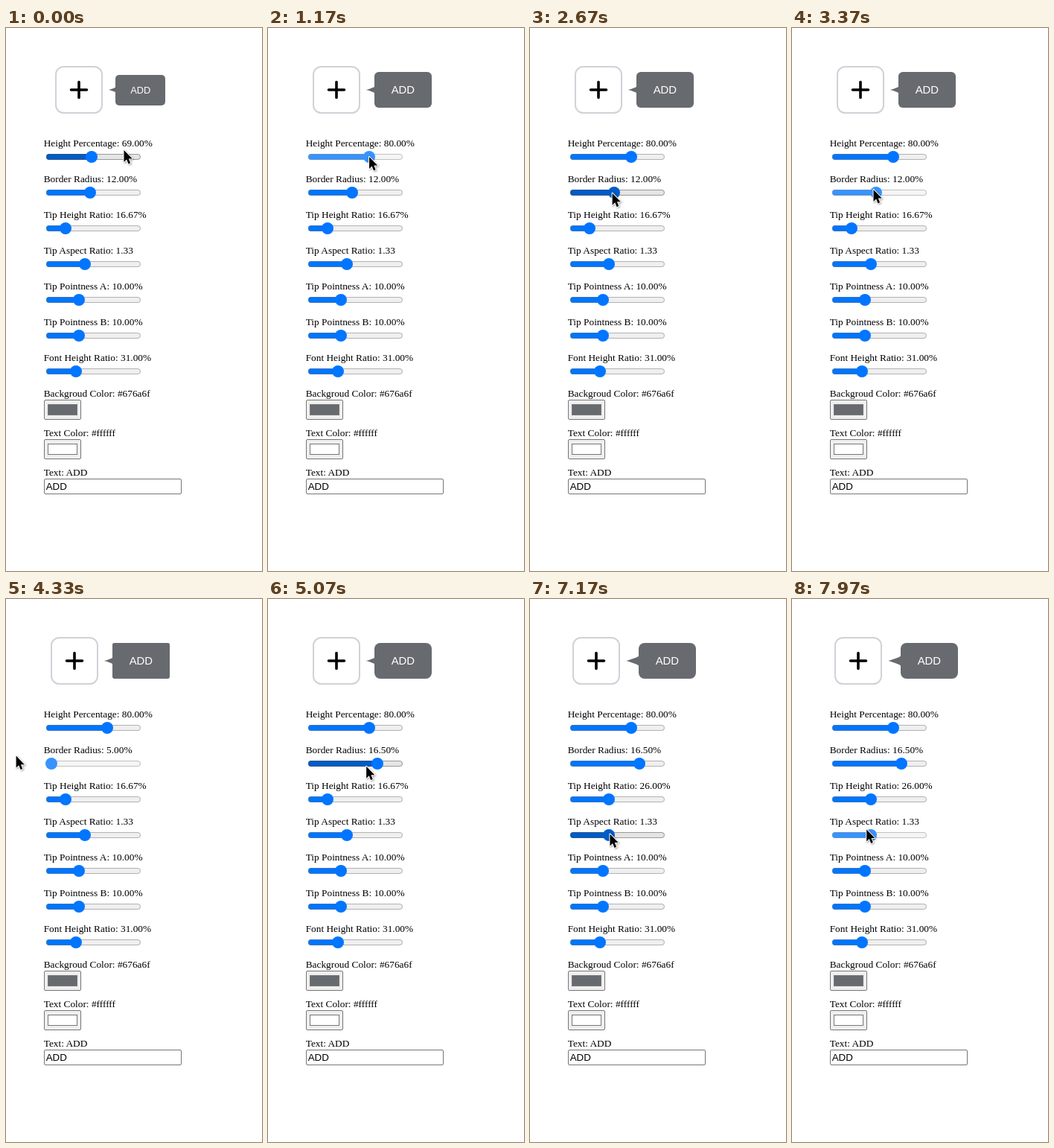
Animation, 344 px wide and 729 px high, one loop 8 s. Source, as an HTML page:

```html
<!DOCTYPE html>
<html lang="en">
<head>
<meta charset="utf-8">
<title>Tooltip playground</title>
<style>
  html, body { margin: 0; width: 100%; height: 100%; overflow: hidden; background: #fff; }
  svg { position: absolute; left: 0; top: 0; }
  .label, .sans { position: absolute; white-space: pre; }
  .label { left: 50.7px; font: 13.3333px "Liberation Serif", "Times New Roman", serif; }
  .sans { font: 13.3333px "Liberation Sans", Arial, sans-serif; }
  #bubble { display: flex; align-items: center; justify-content: center; color: #fff; background: #676a6f; }
  .field { fill: #fff; stroke: #767676; }
  .slider, .thumb { --accent: #0075ff; --track: #efefef; --edge: #767676; }
  .hover { --accent: #005cc8; --track: #e5e5e5; --edge: #4f4f4f; }
  .active { --accent: #3793ff; --track: #f5f5f5; --edge: #8d8d8d; }
  .track { fill: var(--track); }
  .fill, .thumb { fill: var(--accent); }
  .edge { fill: none; stroke: var(--edge); stroke-opacity: .5; }
  #cursor { filter: drop-shadow(1px 1.5px 1px rgba(0, 0, 0, .35)); }
</style>
</head>
<body>
<svg width="344" height="729">
  <g id="button">
    <rect x="1" y="52" width="62" height="62" rx="10.5" fill="#fff" stroke="#d1d1d8" stroke-width="2"/>
    <path d="M21.5 83h21M32 72.5v21" stroke="#000" stroke-width="3.6" stroke-linecap="round"/>
  </g>
  <path id="tip" fill="#676a6f"/>
  <g id="sliders"></g>
  <rect class="field" x="51.5" y="499.5" width="49" height="26" rx="1.5" style="fill:#efefef"/>
  <rect x="56.5" y="505.5" width="39" height="14" fill="#676a6f" stroke="#777"/>
  <rect class="field" x="51.5" y="552.5" width="49" height="26" rx="1.5" style="fill:#efefef"/>
  <rect x="56.5" y="558.5" width="39" height="14" fill="#fff" stroke="#777"/>
  <rect class="field" x="51.5" y="605.5" width="184" height="20" rx="1.5"/>
</svg>
<div id="bubble" class="sans">ADD</div>
<div class="label" style="top:483px">Backgroud Color: #676a6f</div>
<div class="label" style="top:536px">Text Color: #ffffff</div>
<div class="label" style="top:589px">Text: ADD</div>
<div class="sans" style="left:53.7px;top:608px">ADD</div>
<svg width="344" height="729">
  <path id="cursor" d="M0 0V16L3.6 12.6L6 18.4L8.6 17.3L6.3 11.6H11.2Z"
        stroke="#fff" stroke-width="2" stroke-linejoin="round" paint-order="stroke"/>
</svg>
<script>
const LOOP = 8000, MIN_X = 60.7, TRAVEL = 113, MID_Y = 83, CENTER_X = 140.1;
const $ = id => document.getElementById(id);

const slider = (label, value, min, max, step = 1, unit = '%') => ({ label, value, min, max, step, unit });
const sliders = [
  slider('Height Percentage', 69, 40, 100),
  slider('Border Radius', 12, 5, 20, 0.5),
  slider('Tip Height Ratio', 16.67, 10, 50),
  slider('Tip Aspect Ratio', 1.33, 0.2, 3, 0.01, ''),
  slider('Tip Pointness A', 10, 0, 30),
  slider('Tip Pointness B', 10, 0, 30),
  slider('Font Height Ratio', 31, 10, 82)
];

// Each gesture approaches a slider, then drags it between press and release.
// A move is: start time, end time, slider value to aim at, height off the track.
const gestures = [
  { press: 630, release: 2060, grip: 0, moves: [
    [30, 370, 69, 0], [630, 930, 80, 0], [1170, 1370, 55, -1], [1570, 1770, 80, -3.5]] },
  { press: 2870, release: 4860, grip: 3.2, moves: [
    [2070, 2400, 14, 29], [2400, 2700, 12, 0], [2870, 3030, 7, -4],
    [3200, 3690, 24.5, -4], [4000, 4360, -1.3, -10.5], [4360, 4570, 16.5, -6]] },
  { press: 5640, release: 6650, grip: 0, moves: [
    [4870, 5600, 16.67, -2], [5640, 5870, 30, -1], [6070, 6400, 27, -1], [6600, 6640, 26, -2]] },
  { press: 7630, release: LOOP, grip: 6.1, moves: [
    [6660, 7150, 1.51, -1.5], [7190, 7370, 1.33, -4.5], [7630, 7770, 1.85, -5], [7770, 7970, 1.33, -7.5]] }
];

const clamp = (v, lo, hi) => Math.min(hi, Math.max(lo, v));
const thumbX = (s, v) => MIN_X + TRAVEL * (v - s.min) / (s.max - s.min);

function ease(t, from, to) {
  const u = clamp((t - from) / (to - from), 0, 1);
  return u * u * (3 - 2 * u);
}

function set(el, attrs) {
  for (const key in attrs) el.setAttribute(key, attrs[key]);
}

function add(parent, name, attrs) {
  const el = document.createElementNS('http://www.w3.org/2000/svg', name);
  set(el, attrs);
  return parent.appendChild(el);
}

sliders.forEach((s, i) => {
  s.y = 173 + 48 * i;
  s.text = document.createElement('div');
  s.text.className = 'label';
  s.text.style.top = s.y - 26 + 'px';
  document.body.insertBefore(s.text, $('bubble'));
  const bar = { x: 54, y: s.y - 4, width: 127, height: 8, rx: 4 };
  s.group = add($('sliders'), 'g', {});
  add(s.group, 'rect', { ...bar, class: 'track' });
  s.fill = add(s.group, 'rect', { ...bar, class: 'fill' });
  add(s.group, 'rect', { class: 'edge', x: 54.5, y: s.y - 3.5, width: 126, height: 7, rx: 3.5 });
  s.thumb = add($('sliders'), 'circle', { cy: s.y, r: 8 });
});

function pointerAt(t) {
  let x = 158.5, y = 164;
  gestures.forEach((g, i) => {
    const s = sliders[i];
    for (const [from, to, value, lift] of g.moves) {
      const k = ease(t, from, to);
      x += (thumbX(s, value) - g.grip - x) * k;
      y += (s.y + lift - y) * k;
    }
  });
  return { x, y };
}

function valueAt(s, i, t) {
  const g = gestures[i];
  if (!g || t < g.press) return s.value;
  const x = pointerAt(Math.min(t, g.release)).x + g.grip;
  const raw = s.min + (x - MIN_X) / TRAVEL * (s.max - s.min);
  return Math.round(clamp(raw, s.min, s.max) / s.step) * s.step;
}

function drawTooltip([height, radius, tipHeight, aspect, pointA, pointB, font]) {
  const h = 60 * height / 100, w = 1.618 * h;
  const half = h * tipHeight / 200, tipW = 2 * half * aspect;
  const left = CENTER_X - (72 + tipW + w) / 2;
  const tipX = left + 72, x = tipX + tipW;
  const a = tipX + tipW * pointA / 100, b = half * (1 - 2 * pointB / 100);
  set($('button'), { transform: `translate(${Math.round(left)} 0)` });
  set($('tip'), {
    d: `M${tipX} ${MID_Y}C${a} ${MID_Y} ${x} ${MID_Y - b} ${x} ${MID_Y - half}h1v${2 * half}h-1`
      + `C${x} ${MID_Y + b} ${a} ${MID_Y} ${tipX} ${MID_Y}Z`
  });
  const rows = Math.round(h);
  Object.assign($('bubble').style, {
    left: x + 'px', top: Math.round(MID_Y - rows / 2) + 'px', width: w + 'px', height: rows + 'px',
    borderRadius: h * radius / 100 + 'px', fontSize: h * font / 100 + 'px'
  });
}

function render(t) {
  const { x, y } = pointerAt(t);
  const dragged = gestures.findIndex(g => t >= g.press && t < g.release);
  const values = sliders.map((s, i) => valueAt(s, i, t));
  sliders.forEach((s, i) => {
    const cx = Math.round(thumbX(s, values[i]));
    const over = dragged < 0 && Math.abs(y - s.y) < 9.5 && x > 53 && x < 182;
    const state = dragged === i ? ' active' : over ? ' hover' : '';
    const onThumb = dragged === i || Math.abs(x - cx) < 8;
    set(s.group, { class: 'slider' + state });
    set(s.thumb, { class: 'thumb' + (onThumb ? state : ''), cx });
    set(s.fill, { width: cx - 54 });
    s.text.textContent = `${s.label}: ${values[i].toFixed(2)}${s.unit}`;
  });
  drawTooltip(values);
  set($('cursor'), { transform: `translate(${x} ${y})` });
}

const start = performance.now();
function tick() {
  render((performance.now() - start) % LOOP);
  requestAnimationFrame(tick);
}
tick();
</script>
</body>
</html>
```
